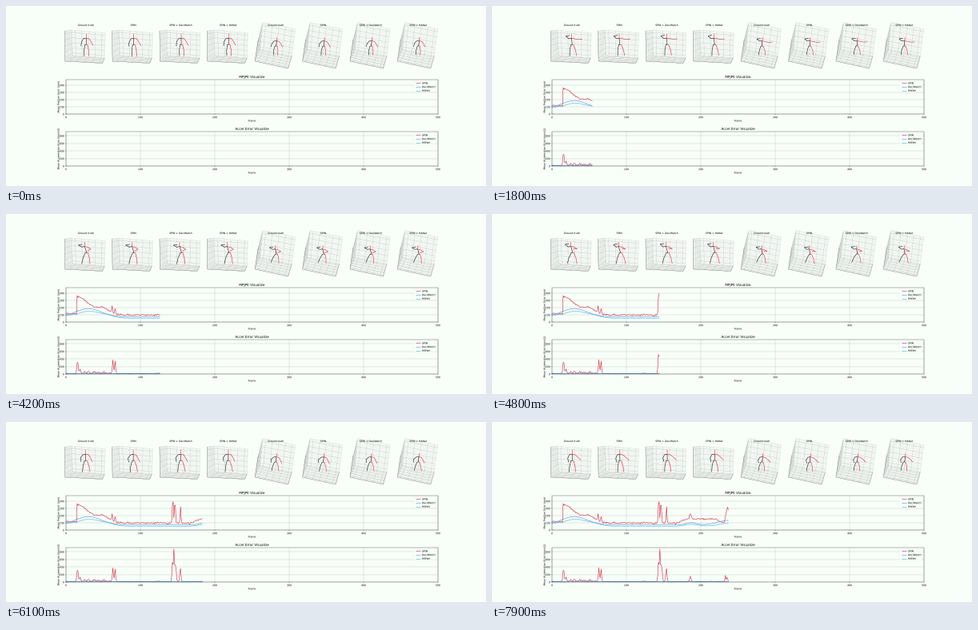
These frames come from a looping animation (600 px wide and 225 px high, 8000 ms). A matplotlib script:

```python
import numpy as np
import matplotlib.pyplot as plt
from matplotlib.animation import FuncAnimation
from matplotlib.collections import LineCollection
from matplotlib.patches import PathPatch, Polygon, Rectangle
from matplotlib.textpath import TextPath
from matplotlib.transforms import Affine2D

plt.rcParams["font.family"] = "DejaVu Sans"

W, H, DPI = 600, 225, 25
FRAMES, STEP_MS, SAMPLES = 80, 100, 3
PX = 72 / DPI            # points per pixel
BG = "#f8fef8"
RED, BLUE, CYAN, BLACK = "#d0102c", "#4f7fe6", "#22b4e6", "black"
SMALL, LARGE = 9 / PX, 12 / PX
LEFT, RIGHT, CHART_H = 75, 540, 43.31

fig = plt.figure(figsize=(W / DPI, H / DPI), dpi=DPI, facecolor=BG)
ax = fig.add_axes([0, 0, 1, 1])
ax.set_xlim(0, W)
ax.set_ylim(H, 0)
ax.axis("off")


def label(x, y, text, size=SMALL, align=0.5, angle=0):
    """Text on baseline y; align is the anchor's share of the width."""
    path = TextPath((0, 0), text, size=size)
    box = path.get_extents()
    place = (Affine2D().translate(-box.x0 - align * box.width, 0)
             .rotate_deg(angle).scale(1, -1).translate(x, y))
    ax.add_patch(PathPatch(place.transform_path(path), fc="black", lw=0,
                           snap=False, zorder=6))


def strokes(paths, color, width, z):
    lines = LineCollection(paths, colors=color, linewidths=width * PX, zorder=z)
    ax.add_collection(lines)
    return lines


# ---------------------------------------------------------------- 3D boxes
NAMES = ["Ground truth", "SPIN", "SPIN + DeciWatch", "SPIN + HANet"]
COL = (RIGHT - LEFT) / 9.4
centers = LEFT + COL / 2 + 1.2 * COL * np.arange(8)

# left wall (near top, far top, far bottom, near bottom),
# far right (top, bottom), near right bottom
FRONT = [(-26.5, 31), (-17.5, 30), (-16.5, 62), (-26, 69),
         (24.5, 33.5), (23.5, 65), (20.5, 71.5)]
TILT = [(-22, 42), (-16.5, 20.5), (-19.5, 54), (-26, 69),
        (24.5, 28.7), (20, 62.5), (15.5, 78)]


def wall(corners, color, n=5):
    p, q, r, s = corners
    ax.add_patch(Polygon(corners, fc=color, ec="#d4d8d4", lw=0.3 * PX, zorder=1))
    cuts = []
    for t in (np.arange(n) + 0.5) / n:
        cuts.append((p + (q - p) * t, s + (r - s) * t))
        cuts.append((p + (s - p) * t, q + (r - q) * t))
    strokes(cuts, "#b4b8b4", 0.25, 2)


def box(cx, shape):
    a, b, c, d, e, f, g = np.array(shape) + (cx, 0)
    wall([a, b, c, d], "#f0f4f0")
    wall([b, e, f, c], "#f2f6f2")
    wall([c, f, g, d], "#edf1ed")
    strokes([(a, d, g, f)], "#303230", 0.22, 3)


for i, cx in enumerate(centers):
    box(cx, FRONT if i < 4 else TILT)
    label(cx, 25, NAMES[i % 4])

# ---------------------------------------------------------------- skeleton
# Angles in degrees: 0 hangs down, 90 points right.
# time, sway, lean, left upper arm, forearm, right upper arm, forearm, legs
KEYS = np.array([
    (0,    0.5,   0,  -30,  -5,  35,  25,  -3,  7),
    (1800, 0.5,  -5, -130, 100,  80,  95,  -6, 16),
    (2900, 2.5,   6,  -85, -95, 100, 190,   4,  2),
    (4200, 1.0, -18, -120, 100,  60, 300, -18, 11),
    (4800, 1.0, -15, -130, 100,  60, 265, -20, 16),
    (6100, 0.0,   0,  -40,  10,  30, 385, -10, 15),
    (7900, 0.5,   0,  -25,  15,  50, 405,  -8, 11)], float)
SHOULDER, HIP, TORSO, NECK, ARM, LEG, KNEE = 3.5, 1.6, 8, 5.5, 5, 7.2, 5


def limb(start, length, *angles):
    points = [start]
    for a in np.radians(angles):
        points.append(points[-1] + length * np.array([np.sin(a), np.cos(a)]))
    return points


def body(t):
    """Four joint chains: left arm, left leg, right arm, right leg."""
    i = min(np.searchsorted(KEYS[:, 0], t, "right"), len(KEYS) - 1) - 1
    a, b = KEYS[i], KEYS[i + 1]
    u = (t - a[0]) / (b[0] - a[0])
    pose = a + (b - a) * u * u * (3 - 2 * u)
    pose[3:7] += 18 * np.sin(2 * np.pi * u)      # arms swing between poses
    _, sway, lean, lu, lf, ru, rf, ll, rl = pose
    hip = np.array([sway, 48.2])
    neck = limb(hip, TORSO, 180 - lean)[1]
    head = neck - (0, NECK)
    arms = [limb(neck + (s * SHOULDER, .7), ARM, *turn)
            for s, turn in ((-1, (lu, lf)), (1, (ru, rf)))]
    legs = [limb(hip + (s * HIP, .2), LEG, turn + s * KNEE, turn - s * KNEE)
            for s, turn in ((-1, ll), (1, rl))]
    chains = [[neck] + arms[0], [neck, hip] + legs[0],
              [head, neck] + arms[1], [hip] + legs[1]]
    return [np.array(c) for c in chains]


def tilt(p):
    dx, up = p[:, 0], 48.2 - p[:, 1]
    return np.column_stack([.95 * dx + .09 * up, 50 + .06 * dx - .8 * up])


# ---------------------------------------------------------------- error data
rng = np.random.default_rng(4)
xs = np.arange(SAMPLES * FRAMES)


def bump(center, height, width, power=2):
    return height * np.exp(-np.abs((xs - center) / width) ** power)


def noise(level):
    return level * rng.standard_normal(len(xs))


pos_spin = (95 + 25 * np.exp(-xs / 60) + (xs >= 15) * bump(15, 240, 22)
            + bump(50, 80, 11) + bump(62, 90, .8) + bump(66, 80, .8)
            + bump(143.6, 350, 1) + bump(146.5, 340, .9) + bump(154, 230, .8)
            + bump(200, 60, 27, 6) + bump(186, 65, 2) + bump(236, 215, 3)
            + noise(6))
pos_deci = (75 + bump(30, 112, 24) + bump(187, 30, 9) + bump(237, 60, 20)
            + noise(1))
pos_ha = (56 + bump(0, 25, 12) + bump(31, 95, 22) + bump(57, 25, 12)
          + bump(188, 26, 12) + bump(238, 42, 18) + noise(1))
acc_spin = (12 + np.abs(noise(8)) + np.abs(noise(1)) * bump(40, 28, 22, 4)
            + bump(15.5, 340, 1.2) + bump(18.7, 130, .8)
            + bump(63, 350, .9) + bump(66, 325, .9)
            + bump(143, 490, .9) + bump(145, 850, 1) + bump(147.3, 450, 1.2)
            + bump(153.7, 360, 1.1) + bump(186, 140, 1.2)
            + bump(233, 170, .8) + bump(235.4, 130, 1))
acc_deci = 9 + 4 * np.abs(np.sin(xs * .21))
acc_ha = 7 + 3 * np.abs(np.sin(xs * .17 + 1))


def chart(top, limit, step, title, unit, data):
    """Draws the chart frame; returns its empty lines with their points."""
    bottom, middle = top + CHART_H, (LEFT + RIGHT) / 2
    at_x = lambda v: LEFT + v * (RIGHT - LEFT) / 500
    at_y = lambda v: bottom - v * CHART_H / limit
    grid, ticks = [], []
    for v in range(0, 501, 100):
        x = at_x(v)
        grid.append([(x, top), (x, bottom)])
        ticks.append([(x, bottom), (x, bottom + 1.2)])
        label(x, bottom + 4.9, str(v))
    for v in range(0, limit, step):
        y = at_y(v)
        grid.append([(LEFT, y), (RIGHT, y)])
        ticks.append([(LEFT, y), (LEFT - 1.2, y)])
        label(LEFT - 2.5, y + 1.15, str(v), align=1)
    strokes(grid, "#b0b0b0", 0.28, 1)
    strokes(ticks, "black", 0.28, 4)
    ax.add_patch(Rectangle((LEFT, top), RIGHT - LEFT, CHART_H, fill=False,
                           ec="black", lw=0.28 * PX, zorder=4))
    label(middle, top - 2, title, LARGE)
    label(middle, bottom + 9.2, "Frame")
    label(66.6, top + CHART_H / 2, unit, angle=90)

    ax.add_patch(Rectangle((509.2, top + 1.7), 29, 14.6, fc=BG, alpha=.8,
                           ec="#d8dcd8", lw=0.28 * PX, zorder=5))
    lines = []
    styles = zip(["SPIN", "DeciWatch", "HANet"], [RED, BLUE, CYAN], data)
    for i, (name, color, values) in enumerate(styles):
        y = top + 4.5 + 4.6 * i
        strokes([[(511.5, y), (517.7, y)]], color, 0.52, 6)
        label(520.2, y + 1.1, name, align=0)
        line, = ax.plot([], [], color=color, lw=0.52 * PX, zorder=3)
        lines.append((line, at_x(xs), at_y(values)))
    return lines


plots = chart(91.97, 478, 100, "MPJPE Visualize", "Mean Position Error (mm)",
              [pos_spin, pos_deci, pos_ha])
plots += chart(156.94, 917, 200, "Accel Error Visualize",
               "Mean Acceleration Error (mm/s2)", [acc_spin, acc_deci, acc_ha])

limbs = [(strokes([], BLACK, 0.52, 4), strokes([], "#f01028", 0.52, 4))
         for _ in centers]
errors = [np.zeros(len(xs)), pos_spin, pos_deci, pos_ha]


def drift(chain, person, n):
    """Pose error of one method: joints far along a chain stray most."""
    size = errors[person][SAMPLES * n] / 250
    reach = np.linspace(.1, 1, len(chain))
    turn = .4 * n + person
    return size * reach[:, None] * (np.sin(turn), np.cos(turn))


def update(n):
    count = SAMPLES * n + 1
    for line, px, py in plots:
        line.set_data(px[:count], py[:count])
    pose = body(n * STEP_MS)
    for i, (cx, (dark, red)) in enumerate(zip(centers, limbs)):
        chains = [c + drift(c, i % 4, n) for c in pose]
        if i >= 4:
            chains = [tilt(c) for c in chains]
        chains = [c + (cx, 0) for c in chains]
        dark.set_segments(chains[:2])
        red.set_segments(chains[2:])
    return [line for line, _, _ in plots] + [c for pair in limbs for c in pair]


anim = FuncAnimation(fig, update, frames=FRAMES, interval=STEP_MS,
                     init_func=lambda: update(0), repeat=True, repeat_delay=0,
                     blit=False, cache_frame_data=False)
plt.show()
```
